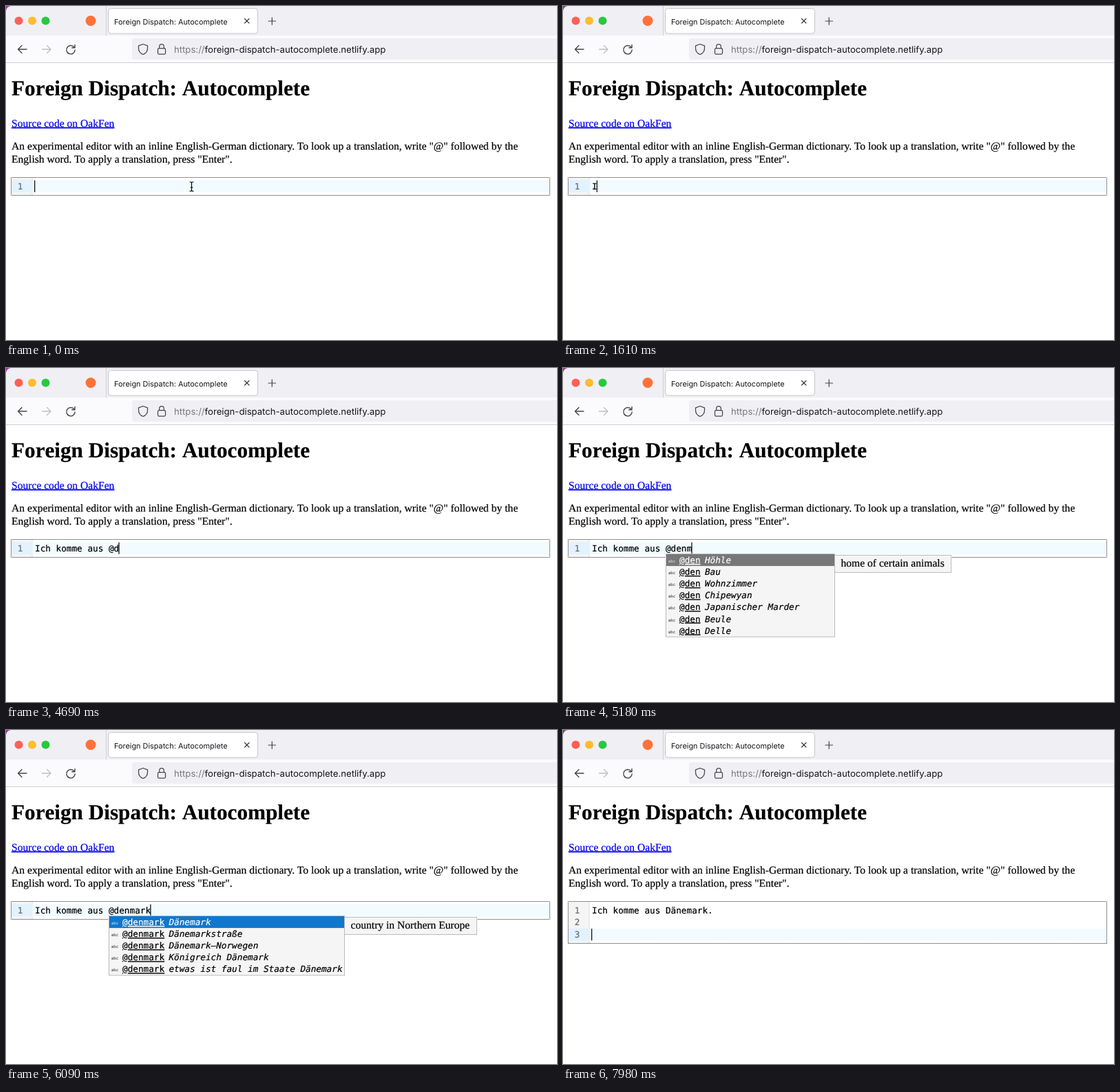
These frames come from a looping animation (800 by 486 pixels, 8 s). An HTML page:

```html
<!DOCTYPE html>
<html lang="en">
<head>
<meta charset="utf-8">
<title>Foreign Dispatch: Autocomplete</title>
<style>
  html, body { margin: 0; width: 100%; height: 100%; overflow: hidden; background: #fff; }
  svg { display: block; width: 100%; height: 100%; }
  text { white-space: pre; text-rendering: geometricPrecision; }
  .ui { font-family: Inter, sans-serif; fill: #15141a; }
  .page { font: 15.6px "Liberation Serif", Times, serif; }
  .page, .mono { stroke: currentColor; stroke-width: .2; }
  .title { font-size: 31.2px; font-weight: bold; font-kerning: none; }
  .link { color: #0000ee; fill: currentColor; text-decoration: underline; }
  .mono { font: 12.7px "DejaVu Sans Mono", monospace; fill: currentColor; }
  .num { color: #6c6c6c; text-anchor: end; }
  .line { fill: none; stroke-linecap: round; stroke-linejoin: round; }
</style>
</head>
<body>
<svg viewBox="0 0 800 486" xmlns="http://www.w3.org/2000/svg">
  <rect width="800" height="486" fill="#fff"/>
  <rect width="800" height="43" fill="#f0f0f4"/>
  <path d="M0 0H7Q1 1 0 7Z" fill="#a03a9c"/>
  <circle cx="18.5" cy="21.5" r="6" fill="#ff5f57"/>
  <circle cx="38" cy="21.5" r="6" fill="#febc2e"/>
  <circle cx="57.5" cy="21.5" r="6" fill="#28c840"/>
  <circle cx="123" cy="21.5" r="7.5" fill="#ff7139"/>
  <path d="M145.5 0V43" stroke="#cfcfd4"/>
  <rect x="148.5" y="3.5" width="217" height="36.5" rx="4" fill="#fff" stroke="#c6c6cc"/>
  <text class="ui" x="157" y="26.5" font-size="10.88">Foreign Dispatch: Autocomplete</text>
  <path class="line" d="M346.5 18.5l6.5 6.5m0-6.5l-6.5 6.5" stroke="#333" stroke-width="1.1"/>
  <path class="line" d="M381 22h10.5M386.25 16.75v10.5" stroke="#444" stroke-width="1.2"/>

  <rect y="43" width="800" height="39" fill="#fbfbfd"/>
  <path d="M0 82.5H800" stroke="#cfcfd2"/>
  <path d="M800 47H187a4 4 0 0 0-4 4v23a4 4 0 0 0 4 4h613z" fill="#f0f0f4"/>
  <g class="line" stroke="#45454d" stroke-width="1.4">
    <path d="M30 63H17.5m5.5-5.5L17.5 63l5.5 5.5"/>
    <path d="M52.5 63H65m-5.5-5.5L65 63l-5.5 5.5" stroke="#bfbfc4"/>
    <path d="M99 60a6.2 6.2 0 1 0 1.2 4M100 56.5v4.2h-4.2"/>
    <path d="M199 55.5l6.5 2.3v3.7c0 4.500-2.5 7.500-6.5 9-4-1.5-6.5-4.5-6.5-9v-3.7z" stroke-width="1.25"/>
    <rect x="220.5" y="61.5" width="11" height="8.5" rx="1.5" stroke-width="1.25"/>
    <path d="M222.7 61.5v-2.7a3.3 3.3 0 0 1 6.6 0v2.7" stroke-width="1.25"/>
  </g>
  <text class="ui" x="244" y="67.5" font-size="13.15"><tspan fill="#77777d">https://</tspan>foreign-dispatch-autocomplete.netlify.app</text>

  <g class="page">
    <text class="title" x="8" y="130.4">Foreign Dispatch: Autocomplete</text>
    <text class="link" x="8" y="175.5">Source code on OakFen</text>
    <text x="8" y="209.2">An experimental editor with an inline English-German dictionary. To look up a translation, write "@" followed by the</text>
    <text x="8" y="228.4">English word. To apply a translation, press "Enter".</text>
  </g>

  <rect id="gutter" x="8" y="249.5" width="30" fill="#f5f5f5"/>
  <rect id="edge" x="37.5" y="249.5" width="1" fill="#ddd"/>
  <g id="active">
    <rect x="8" y="253.4" width="30" height="17.7" fill="#e2f2ff"/>
    <rect x="38.5" y="253.4" width="750" height="17.7" fill="#f2fbff"/>
  </g>
  <rect id="frame" x="7.5" y="249.5" width="782" fill="none" stroke="#212121" stroke-dasharray="1 1" stroke-dashoffset=".5"/>
  <g class="mono">
    <text class="num" x="24.5" y="266.6">1</text>
    <text class="num" id="n2" x="24.5" y="284.3">2</text>
    <text class="num" id="n3" x="24.5" y="302">3</text>
    <text id="typed" x="42" y="266.6"></text>
  </g>
  <rect id="caret" y="253.7" width="1.2" height="17.2"/>
  <g id="denList"></g>
  <g id="denmarkList"></g>
  <path id="mouse" class="line" d="M267 256q2.500 0 2.500 1.5v10.5q0 1.5-2.5 1.5M272 256q-2.5 0-2.5 1.5m0 10.5q0 1.5 2.5 1.5M268 264h3" stroke="#000" stroke-width="1.2"/>
</svg>
<script>
const LOOP = 8000, CHAR = 7.645, LINE = 17.7, ROW = 17.1;
const $ = id => document.getElementById(id);
const phrase = "Ich komme aus @denmark";
// Time of each keystroke of the phrase
const keys = [1540, 1750, 1890, 2030, 2520, 2660, 2800, 2940, 3080, 3220, 3500,
  3640, 3780, 3920, 4340, 4620, 4760, 4900, 5110, 5320, 5530, 5670];
const steps = [{ at: 0, text: "", line: 0 },
  ...keys.map((at, i) => ({ at, text: phrase.slice(0, i + 1), line: 0 })),
  { at: 6440, text: "Ich komme aus Dänemark", line: 0 },
  { at: 6860, text: "Ich komme aus Dänemark.", line: 0 },
  { at: 7350, text: "Ich komme aus Dänemark.", line: 1 },
  { at: 7560, text: "Ich komme aus Dänemark.", line: 2 }];
const popup = { open: 5040, stale: 5110, fresh: 5810, close: 6440 };

function add(parent, tag, attrs, content = "") {
  const el = document.createElementNS("http://www.w3.org/2000/svg", tag);
  for (const k in attrs) el.setAttribute(k, attrs[k]);
  el.textContent = content;
  parent.append(el);
  return el;
}

function buildList(g, word, items, right, info, infoRight) {
  const box = { fill: "#f5f5f5", stroke: "#bbb" };
  add(g, "rect", { x: 149.5, y: 270.5, width: right - 149.5, height: items.length * ROW + 1, ...box });
  const bar = add(g, "rect", { x: 150, y: 271, width: right - 150.5, height: ROW, fill: "#1177cc" });
  items.forEach((item, i) => {
    const y = 284 + i * ROW, color = i ? "#000" : "#fff";
    const row = add(g, "g", { color });
    add(row, "text", { class: "mono", x: 153, y: y - 1, opacity: .6, style: "font-size:5.6px" }, "abc");
    add(row, "text", { class: "mono", x: 169, y, "text-decoration": "underline" }, word);
    add(row, "text", { class: "mono", x: 175.3 + word.length * CHAR, y, style: "font-style:italic" }, item);
  });
  add(g, "rect", { x: right, y: 272.5, width: infoRight - right, height: 25, ...box });
  add(g, "text", { class: "page", x: right + 9, y: 289 }, info);
  return bar;
}

const denBar = buildList($("denList"), "@den",
  ["Höhle", "Bau", "Wohnzimmer", "Chipewyan", "Japanischer Marder", "Beule", "Delle"],
  394.5, "home of certain animals", 563.5);
buildList($("denmarkList"), "@denmark",
  ["Dänemark", "Dänemarkstraße", "Dänemark–Norwegen", "Königreich Dänemark", "etwas ist faul im Staate Dänemark"],
  491.5, "country in Northern Europe", 683.5);

const show = (id, on) => $(id).setAttribute("visibility", on ? "visible" : "hidden");

function draw(t) {
  const { at, text, line } = steps.findLast(s => s.at <= t);
  const shift = `translate(0 ${line * LINE})`;
  const height = 26 + Math.round(line * LINE);
  $("typed").textContent = text;
  $("active").setAttribute("transform", shift);
  $("caret").setAttribute("transform", shift);
  $("caret").setAttribute("x", 41.1 + (line ? 0 : text.length * CHAR));
  $("frame").setAttribute("height", height);
  for (const id of ["gutter", "edge"]) $(id).setAttribute("height", height);
  show("n2", line > 0);
  show("n3", line > 1);
  show("caret", (t - at) % 1200 < 600);
  show("mouse", t < keys[0]);
  show("denList", t >= popup.open && t < popup.fresh);
  show("denmarkList", t >= popup.fresh && t < popup.close);
  denBar.setAttribute("fill", t < popup.stale ? "#1177cc" : "#777");
}

const start = performance.now();
function tick() {
  draw((performance.now() - start) % LOOP);
  requestAnimationFrame(tick);
}
tick();
</script>
</body>
</html>
```
